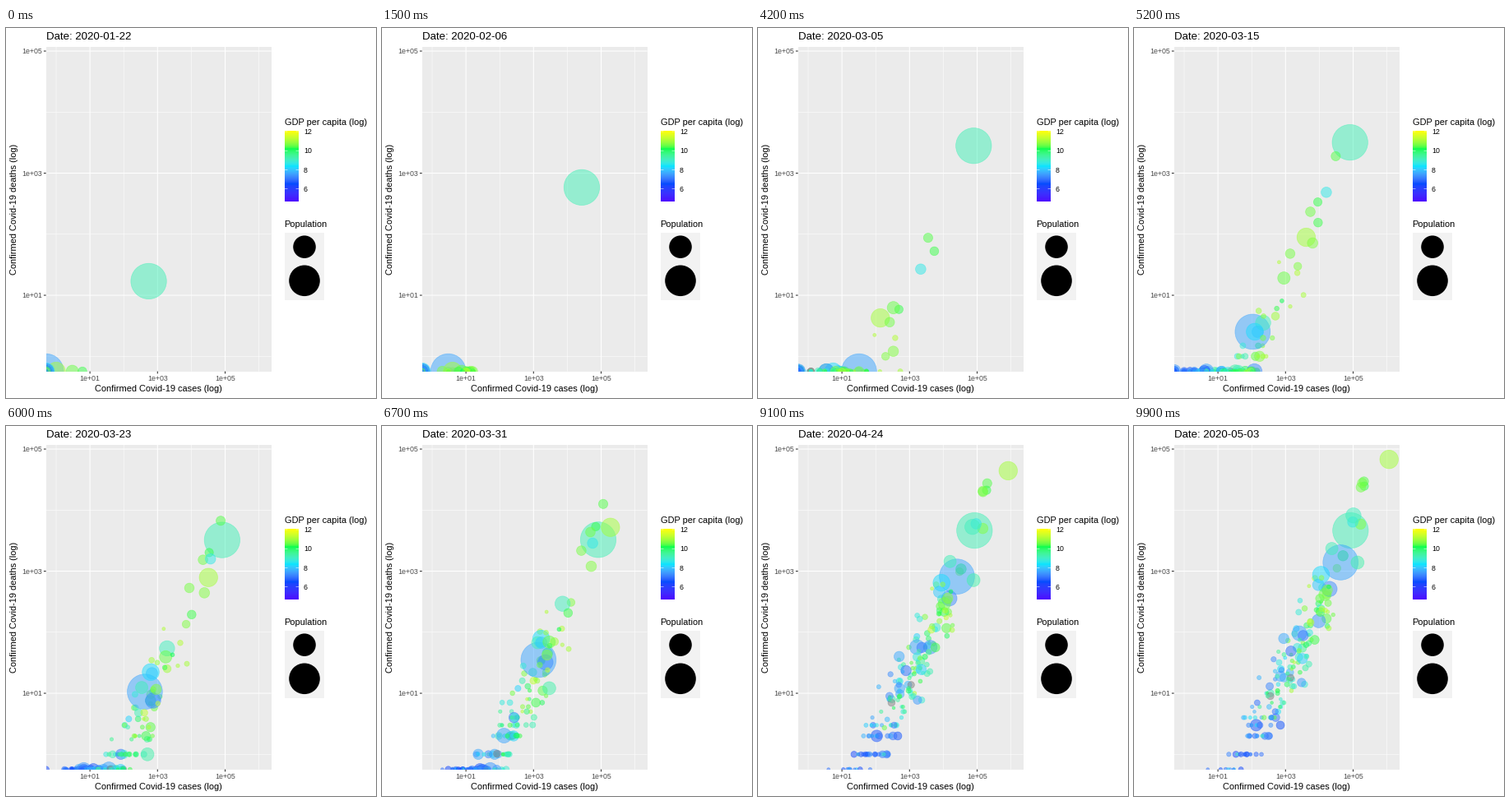
Write a matplotlib script that moves like this. It is 450x450 px and loops after 10 s.

```python
import numpy as np
import matplotlib.pyplot as plt
from matplotlib.animation import FuncAnimation
from matplotlib.colors import to_rgb
from matplotlib.patches import Circle, Rectangle

SIZE, FRAMES, LAST = 450, 100, 102
START = np.datetime64("2020-01-22")
DAYS = np.arange(LAST + 1)
LEFT, RIGHT, TOP, BOTTOM = 48.7, 322.6, 22.9, 417.6
GDP_MIN, GDP_MAX = 4.66, 12.1
MAX_POP = 1393
GREY = (.5, .5, .5)

plt.rcParams["font.family"] = "Liberation Sans"
rng = np.random.default_rng(19)


def px(v):
    return 61 + 41.1 * v


def py(v):
    return 399.3 - 74.25 * v


# --- colour scale, blended in Lab ---------------------------------------
TO_XYZ = np.array([[.4124, .3576, .1805], [.2126, .7152, .0722], [.0193, .1192, .9505]])
WHITE = TO_XYZ.sum(axis=1)


def to_lab(color):
    c = np.array(to_rgb(color))
    c = np.where(c > .04045, ((c + .055) / 1.055) ** 2.4, c / 12.92)
    q = TO_XYZ @ c / WHITE
    f = np.where(q > .008856, np.cbrt(q), 7.787 * q + 16 / 116)
    return np.array([116 * f[1] - 16, 500 * (f[0] - f[1]), 200 * (f[1] - f[2])])


def from_lab(lab):
    fy = (lab[0] + 16) / 116
    f = np.array([fy + lab[1] / 500, fy, fy - lab[2] / 200])
    q = np.where(f > .2069, f ** 3, (f - 16 / 116) / 7.787)
    c = np.clip(np.linalg.solve(TO_XYZ, q * WHITE), 0, 1)
    c = np.where(c > .0031308, 1.055 * c ** (1 / 2.4) - .055, 12.92 * c)
    return np.clip(c, 0, 1)


STOPS = np.array([to_lab(c) for c in
                  ("#4C00FF", "#004CFF", "#00E5FF", "#00FF4D", "#FFFF00")])


def ramp(t):
    return from_lab([np.interp(t, np.linspace(0, 1, 5), STOPS[:, k]) for k in range(3)])


def gdp_color(log_gdp):
    return ramp((log_gdp - GDP_MIN) / (GDP_MAX - GDP_MIN))


def radius(pop):
    return .375 * (2.845 * (1 + 19 * np.sqrt(pop / MAX_POP)) + .94)


# --- bubbles --------------------------------------------------------------
cases, deaths, radii, colors = [], [], [], []


def add(pop, color, count, lost):
    radii.append(radius(pop))
    colors.append((*color, .5))
    with np.errstate(divide="ignore"):
        cases.append(np.log10(np.round(count)))
        deaths.append(np.log10(np.floor(lost + .3)))


def outbreak(pop, wealth, onset, final, fatal, tau=None, color=None):
    """Log cases saturate towards `final`; deaths follow five days later."""
    tau = tau or max(12, 14 + .6 * (onset - 28))
    end = 1 - np.exp((onset - LAST) / tau)

    def curve(t):
        level = final * (1 - np.exp((onset - t) / tau)) / end
        return np.where(t >= onset, 10 ** level, 0)

    travellers = rng.integers(2, 17) if wealth > 10 else 0
    count = np.maximum(curve(DAYS), travellers * (DAYS >= onset - 25))
    add(pop, gdp_color(wealth) if color is None else color, count, fatal * curve(DAYS - 5))


def keyed(pop, wealth, *keys):
    """Straight log growth between (day, cases, deaths) points."""
    d, c, k = np.array(keys, float).T

    def grow(v):
        on = v > 0
        return 10 ** np.interp(DAYS, d[on], np.log10(v[on]), left=-np.inf)

    add(pop, gdp_color(wealth), grow(c), grow(k))


def minor(n):
    """Smaller countries: the richer, the earlier and the larger the outbreak."""
    for _ in range(n):
        rich = rng.uniform()
        pop = np.clip(np.exp(rng.normal(1.9, 1.3)), .05, 80)
        onset = np.clip(rng.normal(55 - 20 * rich, 4), 20, 66)
        final = 1.25 + 2.35 * rich + .65 * np.log10(pop) + rng.normal(0, .45)
        fatal = 10 ** rng.normal(-1.6, .33)
        outbreak(pop, 6.3 + 5.1 * rich, onset, np.clip(final, .7, 4.7), min(fatal, .16))


minor(70)
keyed(1393, 9.19, (0, 548, 17), (5, 2877, 82), (13, 19716, 425), (22, 59895, 1369),
      (32, 77022, 2445), (54, 81000, 3210), (85, 83403, 3346), (86, 83760, 4636))
keyed(1353, 7.61, (8, 1, 0), (12, 3, 0), (39, 3, 0), (42, 28, 0), (52, 82, 2),
      (69, 1397, 35), (78, 6725, 226), (94, 25800, 830), (102, 42505, 1391))
keyed(327, 11.05, (0, 1, 0), (30, 15, 0), (38, 24, 1), (54, 4700, 101),
      (69, 188000, 5200), (78, 440000, 19500), (102, 1158000, 67700))

# pop, log GDP, onset day, final log cases, fatality
for row in ((60, 10.45, 28, 5.32, .145), (47, 10.32, 32, 5.33, .123),
            (67, 10.63, 33, 5.23, .15), (66, 10.67, 37, 5.27, .17),
            (83, 10.77, 32.5, 5.22, .038), (82, 8.64, 28, 4.99, .067),
            (209, 9.1, 41, 5.01, .097), (144, 9.33, 46, 5.13, .014),
            (268, 8.27, 39.5, 4.05, .089), (212, 7.3, 40.5, 4.3, .03),
            (196, 7.61, 48.5, 3.41, .048), (161, 7.44, 56.5, 3.98, .026),
            (126, 9.18, 44, 4.37, .125), (107, 8.04, 38.5, 3.97, .072),
            (109, 6.65, 46.5, 2.13, .026)):
    outbreak(*row)
outbreak(127, 10.58, 5, 4.17, .034, tau=55)
outbreak(52, 10.35, 25, 4.03, .02, tau=7)
for pop, final, fatal in ((25, 3.15, .015), (29, 2.55, .03)):
    outbreak(pop, 8, 42, final, fatal, color=GREY)
minor(90)

X, Y = np.array(cases), np.array(deaths)


# --- stage ------------------------------------------------------------------
fig = plt.figure(figsize=(SIZE / 72, SIZE / 72), dpi=72, facecolor="white")
ax = fig.add_axes([0, 0, 1, 1])
ax.axis("off")


def box(x, y, w, h, color):
    return ax.add_patch(Rectangle((x, y), w, h, fc=color, ec="none", zorder=0))


def line(x0, y0, x1, y1, color="white", lw=1.07):
    ax.plot([x0, x1], [y0, y1], color=color, lw=lw, solid_capstyle="butt",
            snap=False, zorder=1.5)


def label(x, y, s, size=11, color="black", **kw):
    return ax.text(x, y, s, fontsize=size, color=color, **kw)


panel = box(LEFT, TOP, RIGHT - LEFT, BOTTOM - TOP, "#EBEBEB")
for v in range(7):
    line(px(v), TOP, px(v), BOTTOM, lw=1.07 if v % 2 else .53)
for v in range(6):
    line(LEFT, py(v), RIGHT, py(v), lw=1.07 if v % 2 else .53)
for v in (1, 3, 5):
    name = f"1e+0{v}"
    line(px(v), BOTTOM, px(v), BOTTOM + 2.8, "#333333")
    line(LEFT - 2.8, py(v), LEFT, py(v), "#333333")
    label(px(v), 429.3, name, 8.8, "#4D4D4D", ha="center")
    label(44, py(v) + 3.2, name, 8.8, "#4D4D4D", ha="right")

title = label(LEFT, 14.3, "", 13.2)
label(185.7, 442, "Confirmed Covid-19 cases (log)", ha="center")
label(13, 220.3, "Confirmed Covid-19 deaths (log)", rotation=90,
      rotation_mode="anchor", ha="center", va="baseline")

label(338.7, 118, "GDP per capita (log)")
bar = np.array([[ramp(t)] for t in np.linspace(1, 0, 100)])
ax.imshow(bar, extent=(339, 356, 211, 125), aspect="auto", zorder=1)
for v in (6, 8, 10, 12):
    y = 211.2 - 86.4 * (v - GDP_MIN) / (GDP_MAX - GDP_MIN)
    line(339, y, 342.5, y, lw=.5)
    line(352.6, y, 356, y, lw=.5)
    label(361.8, y + 3.2, str(v), 8.8)

label(338.4, 242, "Population")
box(339, 249, 48, 82, "#F2F2F2")
for y, pop in ((266.2, 500), (307.3, 1000)):
    ax.add_patch(Circle((363, y), radius(pop) + .2, fc="black", ec="none", zorder=2))
ax.set(xlim=(0, SIZE), ylim=(SIZE, 0))

dots = ax.scatter(np.zeros(len(radii)), np.zeros(len(radii)), s=(2 * np.array(radii)) ** 2,
                  facecolors=colors, edgecolors=colors, linewidths=.71, zorder=3)
dots.set_clip_path(panel)


def at(logs, day, frac):
    if frac == 0:
        return logs[:, day]
    return (1 - frac) * logs[:, day] + frac * logs[:, day + 1]


def draw(i):
    t = i * LAST / (FRAMES - 1)
    day = int(t)
    x = np.maximum(px(at(X, day, t - day)), LEFT)
    y = np.minimum(py(at(Y, day, t - day)), BOTTOM)
    dots.set_offsets(np.column_stack([x, y]))
    title.set_text(f"Date: {START + day}")
    return dots, title


anim = FuncAnimation(fig, draw, frames=FRAMES, interval=100, repeat=True, repeat_delay=0)
plt.show()
```
